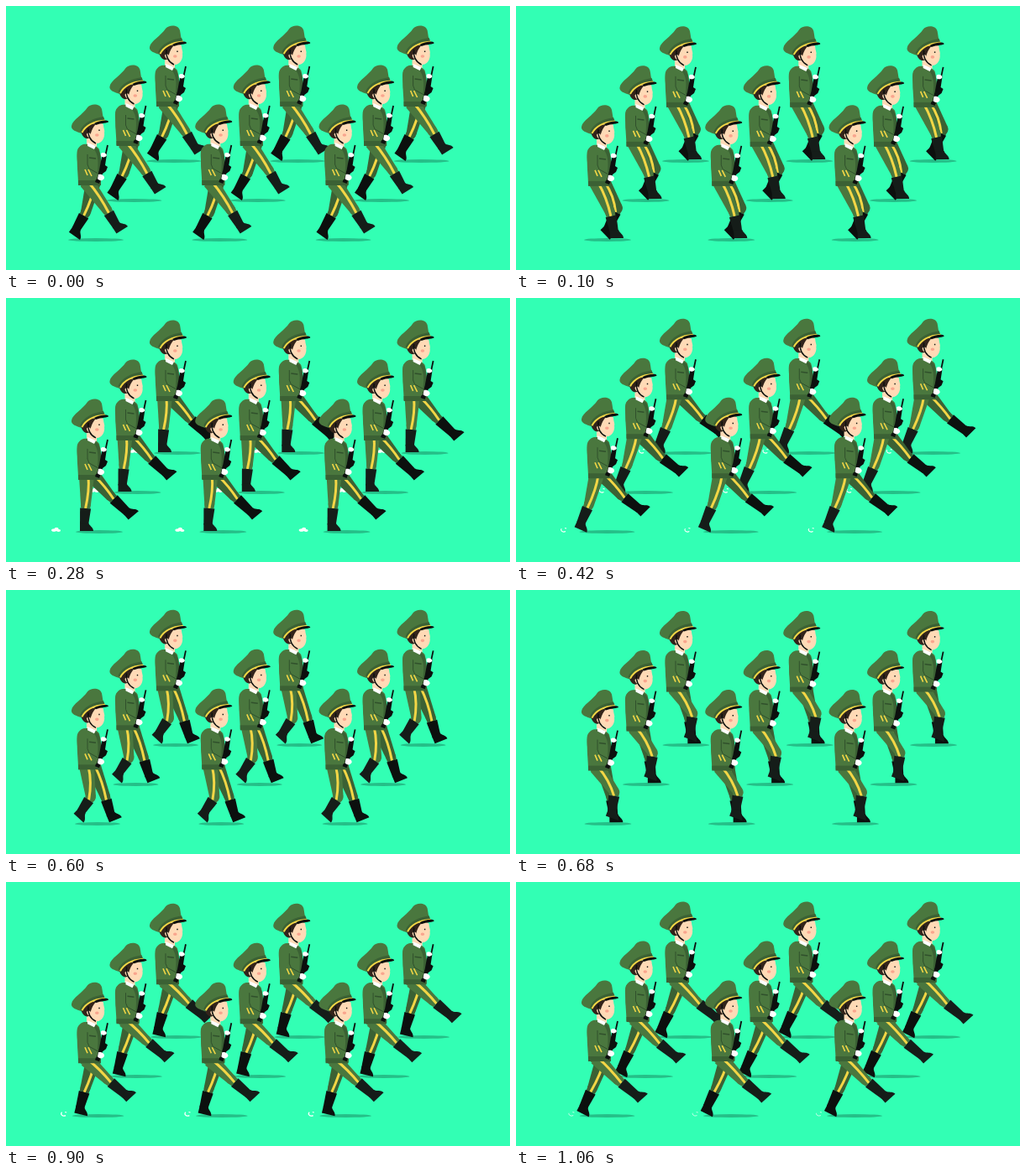
Write an HTML page with a canvas that moves like this. It is 600 px wide and 315 px high and loops after 1.08 s.

```html
<!DOCTYPE html>
<html>
<head>
<meta charset="utf-8">
<title>Marching squad</title>
<style>
html, body { margin: 0; width: 100%; height: 100%; overflow: hidden; background: #32ffb4; }
canvas { display: block; }
</style>
</head>
<body>
<canvas id="stage" width="600" height="315"></canvas>
<script>
const ctx = document.getElementById('stage').getContext('2d');
const LOOP = 1080, STEP = LOOP / 2, TICK = 20;
const GREEN = '#4a773e', SHADE = '#3b6134', DARK = '#30502c', GOLD = '#f3d646',
      BLACK = '#0c100e', SKIN = '#ffdab6', WHITE = '#fff';

// One leg over a full cycle: time, knee x, y, ankle x, y, foot angle in degrees
const legKeys = [
  [0, 120, 243, 132, 263, -32],
  [60, 114, 246, 121, 269, -22],
  [100, 112, 246, 117, 270, 0],
  [220, 103, 245, 103, 271, 0],
  [280, 95, 246, 93, 271, 0],
  [420, 87, 246, 77, 269, 24],
  [520, 87, 246, 76, 269, 27],
  [540, 91, 246, 79, 267, 35],
  [600, 101, 247, 89, 265, 43],
  [640, 117, 241, 105, 266, 46],
  [760, 118, 241, 132, 262, -30],
  [820, 120, 236, 141, 256, -40],
  [960, 121, 235, 143, 252, -45],
  [1060, 121, 236, 144, 255, -42],
  [1080, 120, 243, 132, 263, -32]
];
// Ground shadow over one step: time, centre x, half width
const shadowKeys = [
  [0, 107, 33], [60, 109, 27], [100, 109, 28], [280, 111, 28],
  [420, 108.5, 33], [520, 108.5, 33], [540, 107, 33]
];

function sample(keys, t) {
  const i = keys.findIndex(k => k[0] > t);
  const a = keys[i - 1], b = keys[i], f = (t - a[0]) / (b[0] - a[0]);
  return a.slice(1).map((v, n) => v + (b[n + 1] - v) * f);
}

const shape = (d, fill) => ({ path: new Path2D(d), fill });
const line = (d, stroke, width) => ({ path: new Path2D(d), stroke, width });

const foot = new Path2D('M-5 -2L5 -3C6 1 11 2 11 7L-5 7Z');
const body = [
  // neck, jacket
  shape('M96 158L108 160L108 170L96 168Z', SKIN),
  shape('M92 165C99 164 108 166 111 171C114 181 113 200 113 213L86 213C86 202 84 190 85 175C86 168 89 166 92 165Z', GREEN),
  shape('M107 169C113 172 114 184 113 198L109 198C110 186 110 178 105 171Z', SHADE),
  shape('M86 208L113 208L113 214L86 214Z', SHADE),
  shape('M97 163L107 167L105 171L97 167Z', WHITE),
  line('M99 181L107 182', DARK, 1.5),
  // rifle and hands
  line('M121 166L118 180', BLACK, 1.8),
  shape('M115 176L120 177L118 190L121 192L119 197L115 200L111 212L106 210L111 196L113 185Z', BLACK),
  shape('M113 176C115 174 119 175 120 178C119 181 114 181 113 179Z', WHITE),
  // near arm
  shape('M88 168C94 167 97 172 97 181L99 194L110 200L108 207L93 204C86 202 85 196 85 186C84 176 84 170 88 168Z', GREEN),
  line('M97 177L97 189L99 194L110 200', DARK, 1),
  line('M94 195L97 202M98 195L102 203', GOLD, 1.6),
  shape('M110 201C113 200 117 202 117 205C116 209 111 209 109 206Z', WHITE),
  // head
  shape('M97 145C100 139 115 137 116 142C116 146 118 149 117 151C118 157 114 164 108 164C101 164 97 160 97 154Z', SKIN),
  shape('M89 148C93 141 102 139 107 141C103 145 101 150 100 157C96 160 90 157 89 148Z', '#33241b'),
  shape('M96 153C97 150 101 151 101 154C101 158 97 158 96 153Z', SKIN),
  line('M98 146C97 155 101 161 107 164', BLACK, 1.4),
  shape('M106 154A2.3 1.8 0 1 0 110.6 154A2.3 1.8 0 1 0 106 154Z', '#f9a58e'),
  line('M111 147.5L111 149', BLACK, 1.4),
  // cap
  shape('M78 143C79 136 92 129 97 121C101 116 112 116 114 123C115 128 115 132 117 136C105 137 95 142 90 152C84 150 77 148 78 143Z', GREEN),
  shape('M88 149C92 139 104 134 116 132L118 137C106 137 96 142 91 152Z', SHADE),
  line('M90.500 151C95 142 106 137.500 118 136.500', GOLD, 2),
  shape('M105 140C111 136.500 121 135.500 122 138C122 140 113 139.500 107 142Z', BLACK)
];

function paint(part) {
  if (part.fill) {
    ctx.fillStyle = part.fill;
    ctx.fill(part.path);
  } else {
    ctx.strokeStyle = part.stroke;
    ctx.lineWidth = part.width;
    ctx.stroke(part.path);
  }
}

function disc(x, y, rx, ry, fill) {
  ctx.fillStyle = fill;
  ctx.beginPath();
  ctx.ellipse(x, y, rx, ry, 0, 0, 7);
  ctx.fill();
}

// Straight limb section from (x1, y1) to (x2, y2) with a width at each end
function taper(x1, y1, x2, y2, w1, w2, fill) {
  const len = Math.hypot(x2 - x1, y2 - y1);
  const nx = (y1 - y2) / len / 2, ny = (x2 - x1) / len / 2;
  ctx.fillStyle = fill;
  ctx.beginPath();
  ctx.moveTo(x1 + nx * w1, y1 + ny * w1);
  ctx.lineTo(x2 + nx * w2, y2 + ny * w2);
  ctx.lineTo(x2 - nx * w2, y2 - ny * w2);
  ctx.lineTo(x1 - nx * w1, y1 - ny * w1);
  ctx.fill();
}

function leg(t, bob, hipX, shift, cloth, boot) {
  const [kx, ky, ax, ay, angle] = sample(legKeys, t % LOOP);
  const hipY = 210 + bob;
  ctx.save();
  ctx.translate(shift, 0);
  const topX = kx + (ax - kx) * 0.2, topY = ky + (ay - ky) * 0.2;
  disc(hipX, hipY, 9, 7, cloth);
  taper(hipX, hipY, kx, ky, 18, 12, cloth);
  disc(kx, ky, 6, 6, cloth);
  taper(kx, ky, topX, topY, 12, 11, cloth);
  ctx.strokeStyle = GOLD;
  ctx.lineWidth = 3;
  ctx.beginPath();
  ctx.moveTo(hipX + 2, hipY);
  ctx.quadraticCurveTo((hipX + kx) / 2 + 4, (hipY + ky) / 2, topX, topY);
  ctx.stroke();
  taper(topX, topY, ax, ay, 13, 10, boot);
  ctx.translate(ax, ay);
  ctx.rotate(angle * Math.PI / 180);
  ctx.fill(foot);
  ctx.restore();
}

function dust(phase, near) {
  const k = (phase - 200) / 340;
  if (k <= 0) return;
  const x = (near ? 61 : 72) - 6 * k, y = 277;
  if (k < 0.4) {
    const s = Math.min(1, k * 4.5);
    disc(x - 2.5, y, 3 * s, 1.8 * s, WHITE);
    disc(x + 0.5, y - 1 * s, 2.6 * s, 2.2 * s, WHITE);
    disc(x + 3, y + 0.5, 2.5 * s, 1.4 * s, WHITE);
  } else {
    ctx.strokeStyle = WHITE;
    ctx.lineWidth = 1.9 - 1.3 * k;
    ctx.beginPath();
    ctx.ellipse(x, y - 0.5, 3.5, 2.5, 0, 1, 4.4 - k);
    ctx.moveTo(x + 1, y - 2.500);
    ctx.lineTo(x + 3, y - 2);
    ctx.stroke();
  }
}

function soldier(x, y, t) {
  const phase = t % STEP, near = t < STEP;
  const bob = 3 * Math.sin(Math.PI * phase / STEP) ** 2;
  const [cx, rx] = sample(shadowKeys, phase);
  ctx.save();
  ctx.translate(x, y);
  disc(cx, 279, rx, 2, '#25bf88');
  dust(phase, near);
  leg(t + STEP, bob, 100, 4, SHADE, BLACK);
  leg(t, bob, 96, 0, GREEN, '#151d19');
  ctx.translate(0, bob);
  body.forEach(paint);
  ctx.restore();
}

function draw(now) {
  const t = Math.floor(now % LOOP / TICK) * TICK;
  ctx.fillStyle = '#32ffb4';
  ctx.fillRect(0, 0, 600, 315);
  for (let row = 2; row >= 0; row--)
    for (let col = 0; col < 3; col++)
      soldier(col * 147.3 + row * 46.5 - (row == 1 ? 1 : 0), row * -47, t);
}

const start = performance.now();
function frame() {
  draw(performance.now() - start);
  requestAnimationFrame(frame);
}
frame();
</script>
</body>
</html>
```
